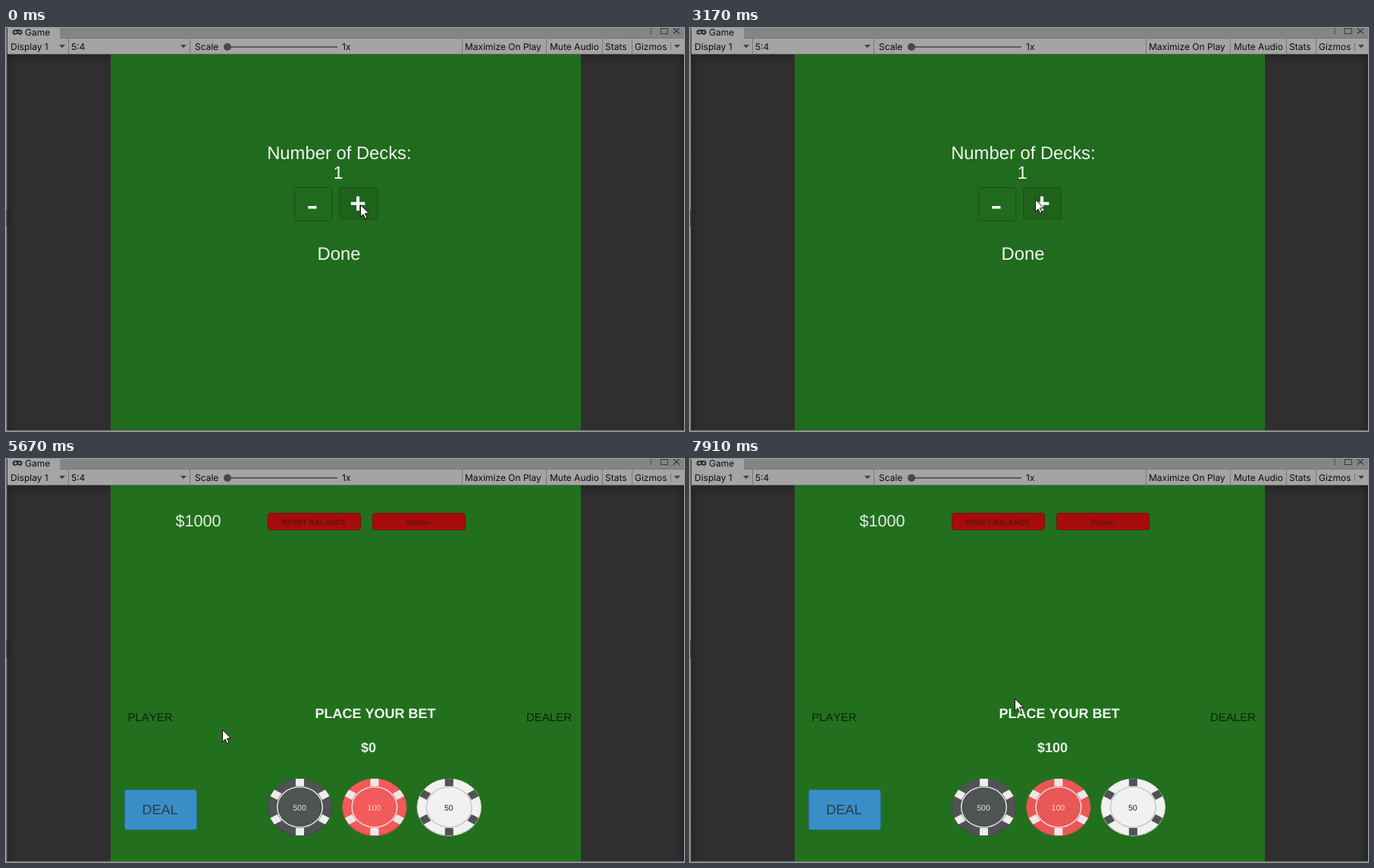
These frames come from a looping animation (894x532 px, 8000 ms). An HTML page with a canvas:

```html
<!DOCTYPE html>
<html lang="en">
<head>
<meta charset="utf-8">
<title>Card table</title>
<style>
html, body { margin: 0; width: 100%; height: 100%; overflow: hidden; background: #2f2f2f; }
canvas { display: block; }
</style>
</head>
<body>
<canvas id="stage" width="894" height="532"></canvas>
<script>
const ctx = document.getElementById('stage').getContext('2d');
const LOOP = 8000;
const STEP = 125;
const DONE_CLICK = 4200;
const TABLE_START = 4320;
const CHIP_CLICK = 6830;
const BET_SHOWN = 6980;

const UI = 'Inter, sans-serif';
const GAME = '"Liberation Sans", Arial, sans-serif';
const WHITE = '#f2f6f2';
const INK = '#0c0c0c';
const GREY = '#3a3a3a';

// Pointer moves: start time, number of steps, end point.
const startPoint = [467, 233];
const moves = [
  [120, 3, 463, 226],
  [1310, 3, 412, 228],
  [2900, 3, 455, 226],
  [3690, 4, 438, 299],
  [5030, 2, 238, 284],
  [5430, 3, 308, 394],
  [5920, 1, 496, 408],
  [6070, 2, 536, 455],
  [6310, 2, 494, 449],
  [7760, 2, 428, 316]
];

// Button clicks: time and change to the number of decks.
const clicks = [[240, 1], [1160, 1], [1730, -1], [2630, -1], [3290, 1]];

function pointer(t) {
  let [x, y] = startPoint;
  for (const [start, steps, toX, toY] of moves) {
    if (t < start) break;
    const done = Math.min(1, (Math.floor((t - start) / STEP) + 1) / steps);
    x += (toX - x) * done;
    y += (toY - y) * done;
  }
  return [Math.round(x), Math.round(y)];
}

function deckCount(t) {
  return clicks.reduce((n, [time, change]) => t >= time ? n + change : n, 1);
}

function rect(x, y, w, h, color) {
  ctx.fillStyle = color;
  ctx.fillRect(x, y, w, h);
}

function label(str, x, y, size, color, weight = 400) {
  ctx.font = `${weight} ${size}px ${GAME}`;
  ctx.fontKerning = 'none';
  ctx.textAlign = 'center';
  ctx.fillStyle = color;
  ctx.fillText(str, x, y);
}

function uiText(str, x, y) {
  ctx.font = `12px ${UI}`;
  ctx.fontKerning = 'auto';
  ctx.textAlign = 'left';
  ctx.fillStyle = INK;
  ctx.fillText(str, x, y);
}

function box(x, y, w, h, fill, border) {
  ctx.beginPath();
  ctx.roundRect(x + 0.5, y + 0.5, w - 1, h - 1, 3);
  ctx.fillStyle = fill;
  ctx.fill();
  ctx.strokeStyle = border;
  ctx.lineWidth = 1;
  ctx.stroke();
}

function poly(points, fill) {
  ctx.beginPath();
  points.forEach(p => ctx.lineTo(p[0], p[1]));
  ctx.closePath();
  ctx.fillStyle = fill;
  ctx.fill();
}

function line(x1, y1, x2, y2, color, width) {
  ctx.beginPath();
  ctx.moveTo(x1, y1);
  ctx.lineTo(x2, y2);
  ctx.strokeStyle = color;
  ctx.lineWidth = width;
  ctx.stroke();
}

function disc(x, y, rx, ry, fill) {
  ctx.beginPath();
  ctx.ellipse(x, y, rx, ry, 0, 0, Math.PI * 2);
  ctx.fillStyle = fill;
  ctx.fill();
}

function shade(x, y, w, h, x1, y1, x2, y2) {
  const g = ctx.createLinearGradient(x1, y1, x2, y2);
  g.addColorStop(0, 'rgba(0,0,0,0.2)');
  g.addColorStop(1, 'rgba(0,0,0,0)');
  rect(x, y, w, h, g);
}

function gamepad() {
  ctx.beginPath();
  ctx.roundRect(8.5, 2, 13, 7, 3.5);
  ctx.fillStyle = '#333';
  ctx.fill();
  rect(10.5, 5, 4, 1, '#a6a6a6');
  rect(12, 3.5, 1, 4, '#a6a6a6');
  disc(18, 5.5, 1.2, 1.2, '#a6a6a6');
  rect(13, 8, 4, 1, '#a6a6a6');
}

// A toolbar cell: left edge, caption, and whether it drops down before the next edge.
function cell(x, caption, pad, arrowX) {
  if (x) rect(x, 14, 1, 20, '#777');
  uiText(caption, x + pad, 29);
  if (arrowX) poly([[arrowX - 4, 22], [arrowX + 4, 22], [arrowX, 26.5]], '#444');
}

function windowIcons() {
  for (let y = 0; y < 9; y += 3) rect(849.5, y, 1.5, 1.5, GREY);
  ctx.strokeStyle = GREY;
  ctx.lineWidth = 1;
  ctx.strokeRect(863.5, 0.5, 9, 7);
  line(880, 0, 888, 7.5, GREY, 1.3);
  line(888, 0, 880, 7.5, GREY, 1.3);
}

function editor() {
  rect(0, 0, 894, 532, '#2f2f2f');
  shade(2, 35, 8, 497, 2, 0, 10, 0);
  shade(884, 35, 10, 497, 894, 0, 884, 0);
  shade(2, 35, 892, 12, 0, 35, 0, 47);

  rect(0, 0, 894, 14, '#848484');
  rect(2, 0, 69, 14, '#a4a4a4');
  rect(71, 13, 823, 1, '#777');
  rect(0, 14, 894, 20, '#a4a4a4');
  rect(0, 34, 894, 1, '#686868');
  rect(0, 0, 1, 532, '#858585');
  rect(1, 0, 1, 532, GREY);
  rect(0, 240, 1, 22, '#444');
  rect(0, 531, 894, 1, '#777');

  gamepad();
  uiText('Game', 25, 10);
  cell(0, 'Display 1', 6, 74);
  cell(82, '5:4', 4, 234);
  cell(242, 'Scale', 7);
  cell(601, 'Maximize On Play', 4);
  cell(712, 'Mute Audio', 5);
  cell(786, 'Stats', 4);
  cell(825, 'Gizmos', 4, 885);
  rect(876, 19, 1, 11, '#777');
  rect(292, 24, 145, 2, '#5c5c5c');
  disc(292, 25, 5, 5, '#484848');
  uiText('1x', 443, 29);
  windowIcons();
}

function stepButton(x, w, h, green, [px, py]) {
  const hover = px >= x && px < x + w && py >= 210 && py < 210 + h;
  box(x, 210, w, h, hover ? '#1e621b' : green, '#184f17');
}

function deckMenu(t, mouse) {
  const green = t < DONE_CLICK ? '#206b1d' : '#20661c';
  rect(138, 35, 620, 496, '#22701d');
  rect(139, 35, 618, 496, green);
  label('Number of Decks:', 439.4, 173, 23.8, WHITE);
  label(deckCount(t), 438, 199, 23.8, WHITE);
  stepButton(380, 50, 45, green, mouse);
  stepButton(439, 51, 43, green, mouse);
  label('-', 404, 249, 46, WHITE);
  label('+', 464, 244, 37, WHITE, 700);
  label('Done', 439, 306, 23.8, WHITE);
}

function chip(i, body, notch, ring, rim, value, ink) {
  const x = 387.5 + i * 98.4;
  const y = 459.5;
  disc(x, y + 0.3, 42.7, 38, rim);
  disc(x, y - 0.3, 41.8, 37, body);
  ctx.save();
  ctx.translate(x, y);
  ctx.scale(1, 0.89);
  ctx.fillStyle = notch;
  for (let k = 0; k < 6; k++) {
    ctx.fillRect(-5.5, -42, 11, 11);
    ctx.rotate(Math.PI / 3);
  }
  ctx.restore();
  ctx.beginPath();
  ctx.ellipse(x, y, 29.8, 26.6, 0, 0, Math.PI * 2);
  ctx.strokeStyle = ring;
  ctx.lineWidth = 1.4;
  ctx.stroke();
  label(value, x - 0.5, 464, 10.6, ink);
}

function redButton(x, caption) {
  box(x, 71, 123, 23, '#a80b0c', '#6d1410');
  label(caption, x + 61, 86.5, 10, '#621314', 700);
}

function redChipColor(t) {
  if (t < CHIP_CLICK - 120) return '#f15b5b';
  return t >= CHIP_CLICK && t < BET_SHOWN ? '#c84b4a' : '#e95857';
}

function table(t) {
  rect(138, 35, 620, 496, '#22701d');
  label('$1000', 253.5, 89, 21.6, '#e6efe5');
  redButton(345, 'RESET BALANCE');
  redButton(483, 'Button');
  label('PLAYER', 190, 346, 15, '#10200f');
  label('DEALER', 716, 346, 15, '#10200f');
  label('PLACE YOUR BET', 487, 342, 18, WHITE, 700);
  label(t < BET_SHOWN ? '$0' : '$100', 478, 387, 18, '#e6efe5', 700);
  box(156, 436, 96, 54, '#3a8ec8', '#2b6c8c');
  label('DEAL', 203, 469, 18, '#2c3a44');
  chip(0, '#4f5354', '#ededed', '#ededed', '#45494a', '500', '#e2e2e2');
  chip(1, redChipColor(t), '#ebe8e8', '#f3e3e3', '#d44e4b', '100', '#f6d0d0');
  chip(2, '#f1f1f1', '#4f5354', '#c4c4c4', '#d0d2d0', '50', '#222');
}

function cursor([x, y]) {
  ctx.save();
  ctx.translate(x + 0.5, y + 0.5);
  poly([[0, 0], [0, 16], [3.7, 12.5], [6.2, 18], [8.5, 17], [6, 11.3], [11, 11.3]], '#fff');
  ctx.strokeStyle = '#111';
  ctx.lineWidth = 1;
  ctx.stroke();
  ctx.restore();
}

function draw(now) {
  const t = now % LOOP;
  const mouse = pointer(t);
  editor();
  if (t < TABLE_START) deckMenu(t, mouse);
  else table(t);
  cursor(mouse);
  requestAnimationFrame(draw);
}

ctx.textRendering = 'geometricPrecision';
requestAnimationFrame(draw);
</script>
</body>
</html>
```
